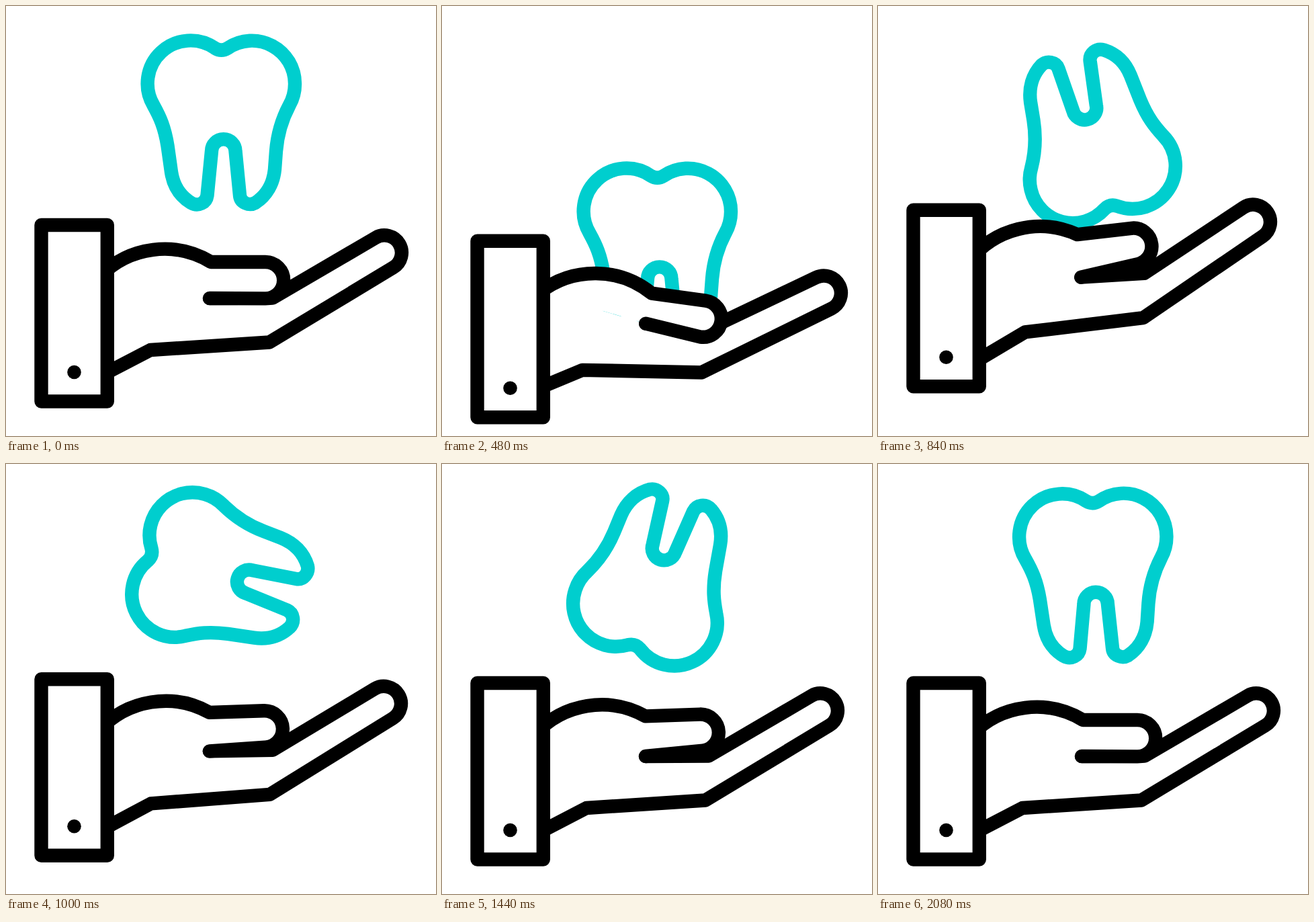
An HTML page for the animation above (2.12 s loop, 640 px wide and 640 px high).

```html
<!DOCTYPE html>
<html lang="en">
<head>
<meta charset="utf-8">
<title>Dental care</title>
<style>
html, body { margin: 0; height: 100%; overflow: hidden; background: #fff; }
svg { display: block; width: 100vw; height: 100vh; }
path, rect { fill: #fff; stroke: #000; stroke-width: 20.4; stroke-linecap: round; stroke-linejoin: round; }
#tooth { stroke: #00cece; }
</style>
</head>
<body>
<svg viewBox="0 0 640 640">
  <path id="tooth" d="M311 62.7Q320.5 68.5 330 62.7A64 64 0 0 1 430 116A64 64 0 0 1 421.6 148C411 168 404 191 402 216L400 243C398 264 388 282 371 293C362 298 349 293 348 282L341.5 216A17.7 17.7 0 0 0 306 216L299.5 282C298 293 286 299 275.5 293C259 283 249 267 246 247L240.5 208C236 180 229 165 219.6 148A64 64 0 0 1 311 62.7Z"/>
  <g id="arm">
    <path id="fingers" d="M303 435L397 434.5L550 345A25.7 25.7 0 0 1 576.3 389.3L392 500.5L215 512L140 551V402"/>
    <path id="thumb"/>
    <rect x="52.5" y="326" width="98.3" height="262.5"/>
    <circle cx="101.5" cy="545" r="10.3"/>
  </g>
</svg>
<script>
const LOOP = 2120, STEP = 40, SPIN_START = 540, WRIST = [140, 444];
const $ = id => document.getElementById(id);
const ease = x => (1 - Math.cos(Math.PI * x)) / 2;

// Eased value between [time, value] keys
function track(keys, t) {
  const i = keys.findIndex(k => k[0] > t);
  if (i < 0) return keys[keys.length - 1][1];
  if (i === 0) return keys[0][1];
  const [t0, a] = keys[i - 1], [t1, b] = keys[i];
  return a + (b - a) * ease((t - t0) / (t1 - t0));
}

function bezier(x1, y1, x2, y2, x) {
  const at = (a, b, s) => 3 * (1 - s) ** 2 * s * a + 3 * (1 - s) * s * s * b + s ** 3;
  let lo = 0, hi = 1;
  for (let i = 0; i < 30; i++) {
    const mid = (lo + hi) / 2;
    if (at(x1, x2, mid) < x) lo = mid; else hi = mid;
  }
  return at(y1, y2, lo);
}

function turn([x, y], deg) {
  const a = deg * Math.PI / 180, c = Math.cos(a), s = Math.sin(a);
  const dx = x - WRIST[0], dy = y - WRIST[1];
  return [WRIST[0] + dx * c - dy * s, WRIST[1] + dx * s + dy * c];
}

const toothY = [[0, 0], [440, 193], [960, -7.5]];
const armY = [[260, 0], [435, 27], [720, -28], [1120, 0]];
const fingerTurn = [[240, 0], [480, 4.9], [760, -3.6], [1240, 2.3], [1440, 0]];
const thumbTurn = [[240, 0], [480, 7.8], [800, -6.9], [1140, 1], [1420, -2], [1680, 0]];

function draw(t) {
  const spin = 720 * bezier(.147, 0, .47, 1, Math.max(0, (t - SPIN_START) / (LOOP - SPIN_START)));
  const f = track(fingerTurn, t), th = track(thumbTurn, t);
  $('tooth').setAttribute('transform', `translate(0 ${track(toothY, t)}) rotate(${spin} 320.5 174)`);
  $('arm').setAttribute('transform', `translate(0 ${track(armY, t)})`);
  $('fingers').setAttribute('transform', `rotate(${f} ${WRIST})`);
  $('thumb').setAttribute('transform', `rotate(${th} ${WRIST})`);
  // The thumb's lower end stays attached to the fingers
  const end = turn([303, 435], f - th);
  $('thumb').setAttribute('d', `M140 402A134 134 0 0 1 305 381H386A27 27 0 0 1 386 435.4L${end}`);
}

const start = performance.now();
function tick() {
  const t = (performance.now() - start) % LOOP;
  draw(Math.floor(t / STEP) * STEP);
  requestAnimationFrame(tick);
}
tick();
</script>
</body>
</html>
```
